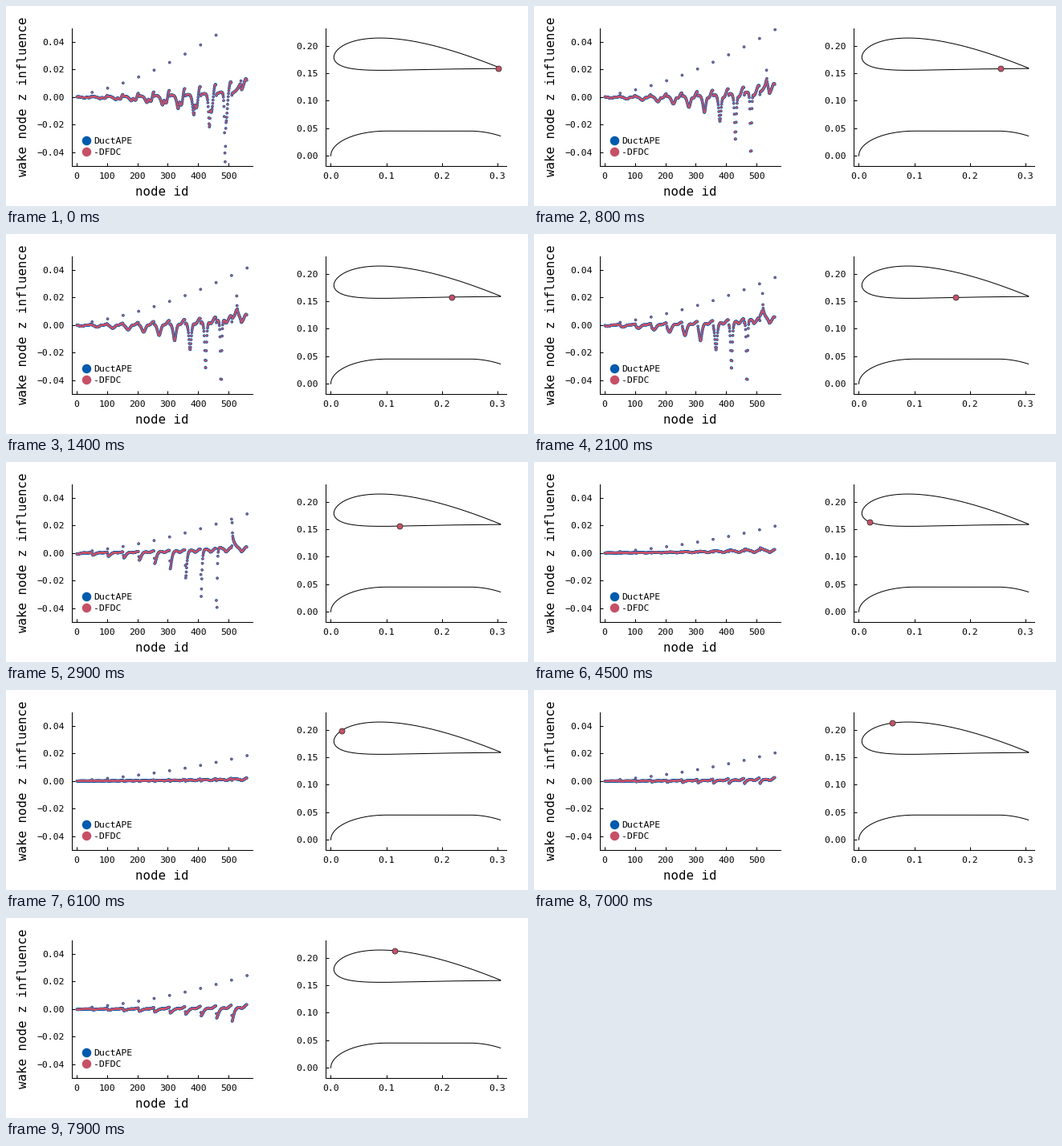
Recreate the animation shown at these times as a matplotlib script. Size 650 by 250 pixels, loop 8 s.

```python
import numpy as np
import matplotlib.pyplot as plt
from matplotlib.animation import FuncAnimation

W, H, DPI = 650, 250, 100
PX = 72 / DPI
FRAMES, INTERVAL = 80, 100
BLUE, RED = "#005aad", "#c65067"

plt.rcParams.update({
    "font.family": "DejaVu Sans Mono",
    "font.size": 11.5 * PX,
    "axes.linewidth": PX,
})

# --- geometry ---------------------------------------------------------
Z_LE, Z_TE, R_LE = 0.0055, 0.3055, 0.179
Z_ROTOR = 0.12
N_DUCT, N_AFT, SHEETS = 31, 19, 11


def surface(z, coefs, s0):
    s = np.sqrt(np.clip((z - Z_LE) / (Z_TE - Z_LE), 0, 1))
    return R_LE + s * np.polyval(coefs, s - s0)


def duct_outer(z):
    return surface(z, [0.0484, -0.1399, -0.1265, 0.06654], 0.526)


def duct_inner(z):
    return surface(z, [0.1044, -0.06842, -0.05754, 0.0822, -0.04413], 0.537)


def hub(z):
    z = np.clip(z, 0, Z_TE)
    nose = np.sqrt(1 - (1 - np.minimum(z, 0.1) / 0.1) ** 2)
    tail = np.maximum(z - 0.25, 0) / (Z_TE - 0.25)
    return 0.045 * nose - 0.009 * tail ** 2


def wake_stations():
    """Even steps behind the rotor, tight at the trailing edge, then growing."""
    t = np.arange(N_DUCT + 1) / N_DUCT
    shape = t - 0.7 / 13 * t ** 13
    front = Z_ROTOR + (Z_TE - Z_ROTOR) * shape / shape[-1]
    g = 1.1765
    aft = Z_TE + 0.0021 * (g ** np.arange(1, N_AFT + 1) - 1) / (g - 1)
    return np.concatenate([front, aft])


def wake_radii(z):
    """Sheets evenly spaced at the rotor, keeping their share of the area."""
    lo, hi = hub(Z_ROTOR), duct_inner(Z_ROTOR)
    r = np.linspace(lo, hi, SHEETS)[:, None]
    share = (r ** 2 - lo ** 2) / (hi ** 2 - lo ** 2)
    return np.sqrt(hub(z) ** 2 + share * (duct_inner(z) ** 2 - hub(z) ** 2))


# --- vortex ring influence --------------------------------------------
def elliptic(kc2):
    """Complete integrals K and E from the complementary parameter."""
    a, b = np.ones_like(kc2), np.sqrt(kc2)
    total, weight = (1 - kc2) / 2, 1.0
    for _ in range(7):
        c = (a - b) / 2
        a, b = (a + b) / 2, np.sqrt(a * b)
        total = total + weight * c ** 2
        weight *= 2
    K = np.pi / (2 * a)
    return K, K * (1 - total)


def ring_vz(dz, a, r):
    far = (a + r) ** 2 + dz ** 2
    near = (a - r) ** 2 + dz ** 2
    K, E = elliptic(near / far)
    return (K + (a ** 2 - r ** 2 - dz ** 2) / near * E) / (2 * np.pi * np.sqrt(far))


Z = wake_stations()
R = wake_radii(Z)
STEP = np.diff(Z)
LENGTH = (np.append(STEP, 0) + np.append(0, STEP)) / 2
NODE = np.arange(1, R.size + 1)

T = (np.arange(80) + 0.5) / 80
TAIL = Z[-1] + 0.15 * T / (1 - T)
TAIL_W = 0.15 / (1 - T) ** 2 / 80


def influence(zc, rc):
    v = ring_vz(Z - zc, R, rc) * LENGTH
    v[:, -1] += (ring_vz(TAIL - zc, R[:, -1:], rc) * TAIL_W).sum(axis=1)
    return v.ravel()


def control_point(frame):
    """Panel centre, walking from the trailing edge round the nose."""
    k = 29 - frame
    if k >= 0:
        pair = Z[k:k + 2]
        return pair.mean(), duct_inner(pair).mean()
    u = abs(frame - 53)
    if frame < 53:
        z = Z_LE + u ** 2 * (2.2e-4 - 5.5e-7 * u)
        return z, float(duct_inner(z))
    z = Z_LE + u ** 2 * (2.38e-4 - 2.9e-6 * u)
    return z, float(duct_outer(z))


# --- figure -----------------------------------------------------------
fig = plt.figure(figsize=(W / DPI, H / DPI), dpi=DPI, facecolor="white")


def panel(x0, x1, xlim, ylim, xticks, yticks):
    top, bottom = 27.5, 200
    ax = fig.add_axes([x0 / W, 1 - bottom / H, (x1 - x0) / W, (bottom - top) / H])
    ax.set(xlim=xlim, ylim=ylim, xticks=xticks, yticks=yticks)
    ax.spines[["top", "right"]].set_visible(False)
    ax.tick_params(direction="in", length=4 * PX, width=PX)
    ax.tick_params(axis="x", pad=8 * PX)
    ax.tick_params(axis="y", pad=9 * PX)
    return ax


def dots(ax, x, color, size, **kw):
    """Round dots, size in pixels, placed with subpixel accuracy."""
    x = np.atleast_1d(x)
    area = np.full(x.size, (size * PX) ** 2)
    return ax.scatter(x, np.zeros(x.size), s=area, color=color, lw=0, **kw)


left = panel(82, 306.5, (-15.8, 577.8), (-0.05, 0.05),
             range(0, 600, 100), np.arange(-2, 3) * 0.02)
right = panel(398, 622.5, (-0.0094, 0.3153), (-0.0186, 0.2322),
              np.arange(4) * 0.1, np.arange(5) * 0.05)

big = dict(fontsize=15.8 * PX, ha="center", va="center")
fig.text(194.5 / W, 1 - 232.3 / H, "node id", **big)
fig.text(21.3 / W, 1 - 113.5 / H, "wake node z influence", rotation=90, **big)

for y, color, name in [(-0.0317, BLUE, "DuctAPE"), (-0.0393, RED, "-DFDC")]:
    left.plot(31, y, "o", color=color, ms=11.5 * PX, mew=0)
    left.text(55, y, name, va="center_baseline")

s = np.linspace(0, 1, 200) ** 2
zd = Z_LE + (Z_TE - Z_LE) * s
zh = Z_TE * s
outline = dict(color="black", lw=PX)
right.plot(np.append(zd[::-1], zd),
           np.append(duct_inner(zd)[::-1], duct_outer(zd)), **outline)
right.plot(zh, hub(zh), **outline)

blue = dots(left, NODE, BLUE, 3.7, zorder=3)
red = dots(left, NODE, RED, 2.4, zorder=4)
marker, = right.plot([], [], "o", mfc=RED, mec="#333333",
                     ms=7 * PX, mew=0.8 * PX, zorder=5)


def update(frame):
    zc, rc = control_point(frame)
    points = np.column_stack([NODE, influence(zc, rc)])
    blue.set_offsets(points)
    red.set_offsets(points)
    marker.set_data([zc], [rc])
    return blue, red, marker


anim = FuncAnimation(fig, update, frames=FRAMES, interval=INTERVAL,
                     init_func=lambda: update(0), repeat=True, repeat_delay=0)
plt.show()
```
